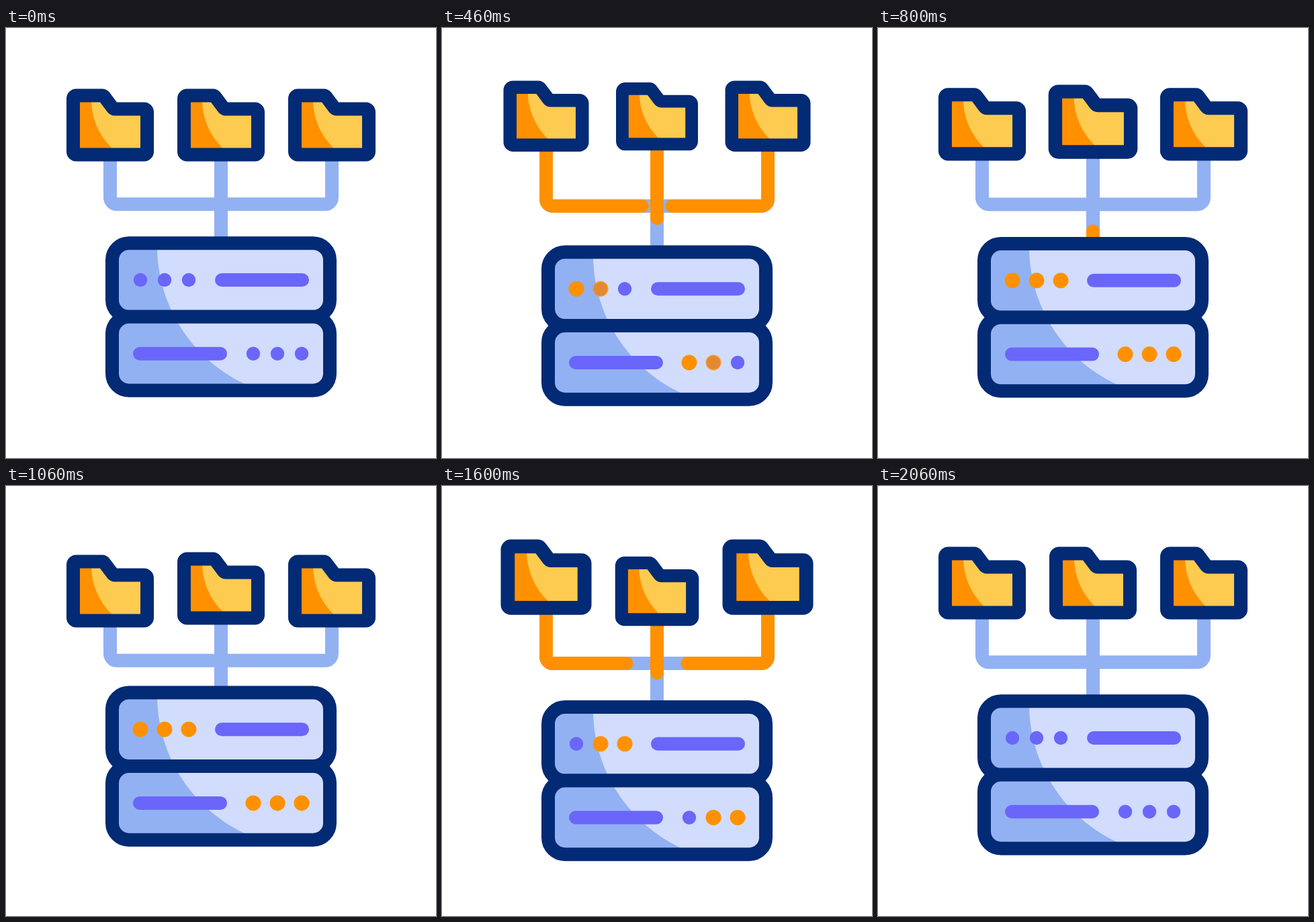
An HTML page with a canvas for the animation above (2300 ms loop, 640 by 640 pixels).

```html
<!DOCTYPE html>
<html>
<head>
<meta charset="utf-8">
<style>
html, body { margin: 0; height: 100%; overflow: hidden; background: #fff; }
canvas { display: block; }
</style>
</head>
<body>
<canvas id="stage" width="640" height="640"></canvas>
<script>
const ctx = document.getElementById('stage').getContext('2d');
const LOOP = 2300, LAG = 80, REPEAT = 1160;
const NAVY = '#032a74', BLUE = '#92b1f3', PALE = '#d2dcfd',
      PURPLE = '#6a66fa', ORANGE = '#ff9100', YELLOW = '#fdcb50';

const ramp = (t, a, b) => Math.min(1, Math.max(0, (t - a) / (b - a)));

// Soft ease: mostly sine, partly linear
function ease(t, a, b) {
  const u = ramp(t, a, b);
  return .3 * u + .35 * (1 - Math.cos(Math.PI * u));
}

// Swing out by 14, across to the far side, back again and home
function swing(t, far) {
  const out = 14, span = out + far;
  return -out * ease(t, 220, 410) + span * ease(t, 410, 1450)
    - span * ease(t, 1450, 1640) + out * ease(t, 1640, 1980);
}

// Shrink, overshoot and settle
function wobble(t, start, end) {
  const low = start + 180, high = start + 340;
  return -.065 * ease(t, start, low) + .125 * ease(t, low, high) - .06 * ease(t, high, end);
}

function disc(x, y, r, color) {
  ctx.fillStyle = color;
  ctx.beginPath();
  ctx.arc(x, y, r, 0, 2 * Math.PI);
  ctx.fill();
}

function stroke(path, color, cap = 'round') {
  ctx.strokeStyle = color;
  ctx.lineWidth = 20;
  ctx.lineCap = cap;
  ctx.lineJoin = 'round';
  ctx.stroke(path);
}

// Two-tone panel: base colour with a big disc in front, then its outline
function panel(path, base, front, x, y, r) {
  ctx.save();
  ctx.clip(path);
  ctx.fillStyle = base;
  ctx.fill(path);
  disc(x, y, r, front);
  ctx.restore();
  stroke(path, NAVY);
}

const folderShape = new Path2D();
const corners = [[-55, -44], [-10, -44], [5, -24], [55, -24], [55, 44], [-55, 44]];
folderShape.moveTo(-55, 0);
corners.forEach((c, i) => folderShape.arcTo(...c, ...corners[(i + 1) % corners.length], 4.5));
folderShape.closePath();

function folder({ x, dy, scale }) {
  ctx.save();
  ctx.translate(x, 144.5 + dy);
  ctx.scale(scale, scale);
  panel(folderShape, ORANGE, YELLOW, 73, -38, 101);
  ctx.restore();
}

function cable(x, top, y, bottom) {
  const path = new Path2D();
  path.moveTo(x, top);
  if (x !== 320) {
    path.arcTo(x, y, 320, y, 10);
    path.lineTo(320, y);
  }
  path.lineTo(320, bottom);
  return { path, length: bottom - top + Math.abs(320 - x) };
}

function pulse({ path, length }, tail, head) {
  if (head <= 0 || tail >= 1) return;
  ctx.setLineDash([(head - tail) * length, 2000]);
  ctx.lineDashOffset = -tail * length;
  stroke(path, ORANGE);
  ctx.setLineDash([]);
}

function bar(x, y) {
  const path = new Path2D();
  path.moveTo(x, y);
  path.lineTo(x + 120, y);
  stroke(path, PURPLE);
}

function lights(x, y, t) {
  for (let i = 0; i < 3; i++) {
    const late = i * 100, cx = x + i * 36;
    disc(cx, y, 10.2, PURPLE);
    ctx.globalAlpha = ramp(t, 280 + late, 380 + late) - ramp(t, 1500 + late, 1600 + late);
    disc(cx, y, 11.5, ORANGE);
    ctx.globalAlpha = 1;
  }
}

function server(dy, t) {
  ctx.save();
  ctx.translate(0, dy);
  for (const y of [320.2, 429.8]) {
    const box = new Path2D();
    box.roundRect(158, y, 324, 109.6, 25);
    panel(box, BLUE, PALE, 451, 325, 226);
  }
  lights(200, 375, t);
  bar(321, 375);
  bar(199, 484.7);
  lights(368, 484.7, t);
  ctx.restore();
}

function draw(t) {
  ctx.fillStyle = '#fff';
  ctx.fillRect(0, 0, 640, 640);

  const drop = -swing(t, 25.8);
  const folders = [155, 485, 320].map(x => {
    const time = x === 320 ? t - LAG : t;
    return {
      x,
      dy: swing(time, 24.8),
      scale: 1 + wobble(time, 220, 820) + wobble(time, 1300, 1980)
    };
  });
  const cables = folders.map(f => cable(f.x, 188.5 + f.dy, 262.3 + drop * .2, 310 + drop));

  const p = t < 1200 ? t : t - REPEAT;
  const head = ease(p, 220, 580), tail = ease(p, 620, 820);
  cables.forEach(c => stroke(c.path, BLUE));
  cables.forEach(c => pulse(c, tail, head));
  folders.forEach(folder);
  server(drop, t);
}

const start = performance.now();
function frame() {
  draw((performance.now() - start) % LOOP);
  requestAnimationFrame(frame);
}
frame();
</script>
</body>
</html>
```
